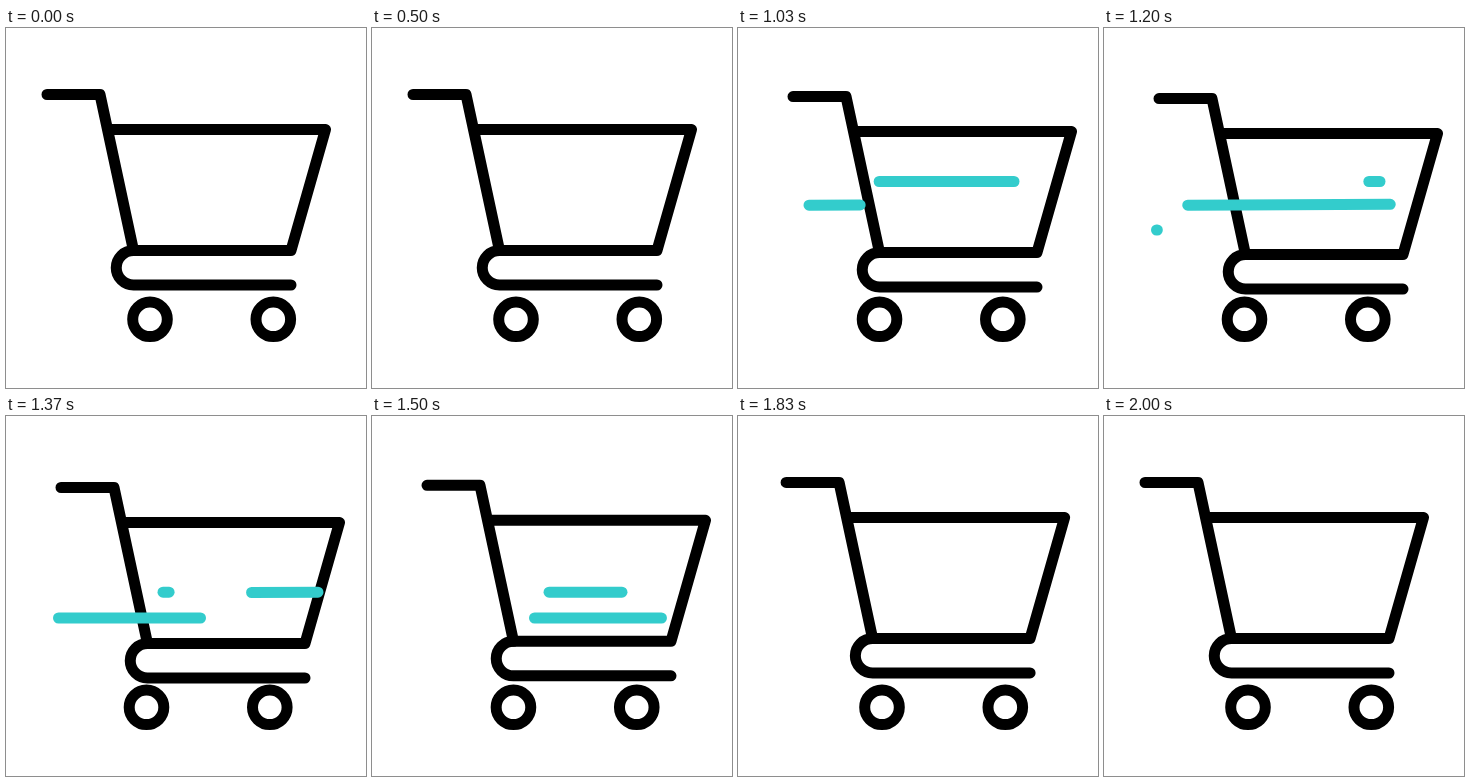
An HTML page for the animation above (2500 ms loop, 360 px wide and 360 px high).

```html
<!DOCTYPE html>
<html lang="en">
<head>
<meta charset="utf-8">
<title>Shopping cart</title>
<style>
  html, body { margin: 0; width: 100%; height: 100%; overflow: hidden; background: #fff; }
  svg { display: block; width: 100%; height: 100%; }
  g { fill: none; stroke: #000; stroke-width: 11; stroke-linecap: round; stroke-linejoin: round; }
</style>
</head>
<body>
<svg viewBox="0 0 360 360">
  <g id="cart">
    <path d="M41 66.5H94L127.5 222.5H285L319.5 101.5H104"/>
    <path d="M127.5 222.5a17.2 17.2 0 0 0 0 34.5H285"/>
  </g>
  <g id="wheels">
    <circle cx="144" cy="291.3" r="17.3"/>
    <circle cx="267.3" cy="291.3" r="17.3"/>
  </g>
  <g id="wind"></g>
</svg>
<script>
const LOOP = 2500, TEAL = '#33cccc', GREY = '#c8c8c8';
const cart = document.getElementById('cart');
const wheels = document.getElementById('wheels');
const wind = document.getElementById('wind');

// Eased progress from 0 to 1 between times a and b
const ease = (t, a, b) => {
  const u = Math.min(1, Math.max(0, (t - a) / (b - a)));
  return u * u * (3 - 2 * u);
};

// x and y ranges, then the start and end times of the head and of the tail
const streaks = [
  { x: [99.5, 276], y: [153.5, 153.5], head: [700, 1030], tail: [930, 1250], greyUntil: 770 },
  { x: [71, 312], y: [177.2, 176.2], head: [930, 1270], tail: [1155, 1485] },
  { x: [52.5, 290], y: [202, 202], head: [1190, 1510], tail: [1375, 1640] },
  { x: [157, 270], y: [176.2, 176.2], head: [1340, 1560], tail: [1450, 1640] }
];
for (const s of streaks) {
  s.node = document.createElementNS('http://www.w3.org/2000/svg', 'path');
  wind.append(s.node);
}

function drawStreak(s, t) {
  const visible = t > s.head[0] && t < s.tail[1];
  s.node.style.display = visible ? '' : 'none';
  if (!visible) return;
  const point = u => s.x[0] + (s.x[1] - s.x[0]) * u + ' ' + (s.y[0] + (s.y[1] - s.y[0]) * u);
  s.node.setAttribute('d', `M${point(ease(t, ...s.tail))}L${point(ease(t, ...s.head))}`);
  s.node.setAttribute('stroke', t < s.greyUntil ? GREY : TEAL);
}

function draw(t) {
  const x = 14 * (ease(t, 500, 725) - ease(t, 1675, 1990));
  const y = 5 * ease(t, 770, 1370) - 5.7 * ease(t, 1380, 1670) + 0.7 * ease(t, 1670, 1850);
  const roll = 3.5 * (ease(t, 1370, 1750) - ease(t, 730, 1200));
  cart.setAttribute('transform', `translate(${x} ${y})`);
  wheels.setAttribute('transform', `translate(${roll} 0)`);
  for (const s of streaks) drawStreak(s, t);
}

const start = performance.now();
function tick() {
  draw((performance.now() - start) % LOOP);
  requestAnimationFrame(tick);
}
tick();
</script>
</body>
</html>
```
